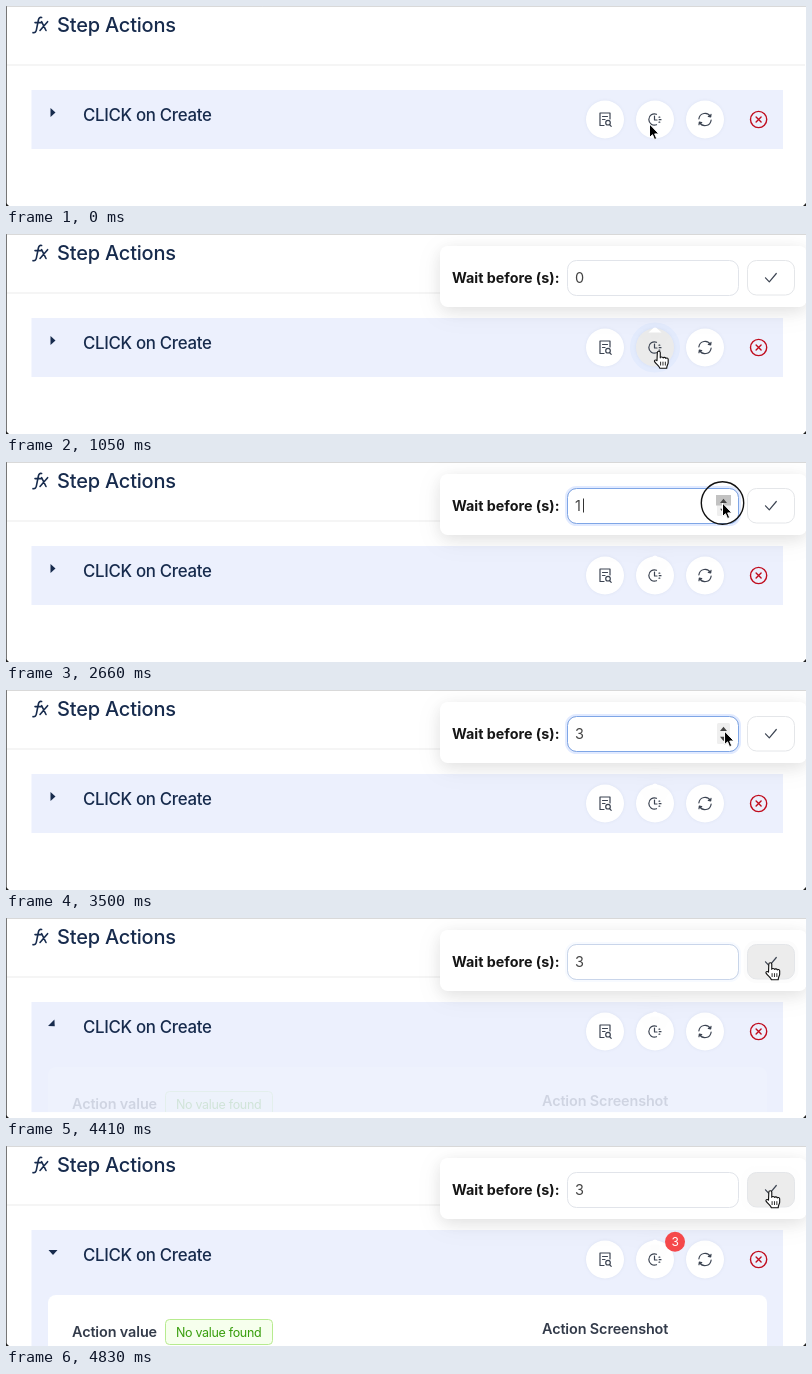
Write an HTML page that moves like this. It is 800x200 px and loops after 5320 ms.

```html
<!DOCTYPE html>
<html lang="en">
<head>
<meta charset="utf-8">
<title>Step Actions</title>
<style>
  html, body { margin: 0; width: 100%; height: 100%; overflow: hidden; background: #fff; }
  svg { display: block; width: 800px; height: 200px; font-family: Inter, "Liberation Sans", sans-serif; letter-spacing: -.02em; }
  .icon { fill: none; stroke: #3c4452; stroke-width: 1.2; stroke-linecap: round; stroke-linejoin: round; }
  .round { fill: #fff; filter: drop-shadow(0 0 1.5px rgba(40, 60, 120, .08)); }
  .bold { font-weight: 600; font-size: 14.4px; fill: #333b4a; letter-spacing: -.008em; }
  #popup { filter: drop-shadow(0 4px 8px rgba(0, 0, 0, .08)) drop-shadow(0 5px 12px rgba(0, 0, 0, .06)); }
</style>
</head>
<body>
<svg viewBox="0 0 800 200">
  <defs><clipPath id="clip"><rect id="clipBox" x="25.5" y="84" width="751.5" height="59"/></clipPath></defs>

  <path d="M27 26.6c2 .5 3-.9 3.4-2.8l2-9.8c.4-2 1.4-3 3.2-2.5M29 16.6h6M34 24.5l7.6-8.8M35.6 15.7l4.4 8.8" class="icon" style="stroke:#172b4d;stroke-width:1.6"/>
  <text x="51" y="26" font-size="20" font-weight="500" fill="#172b4d" letter-spacing="-.01em">Step Actions</text>
  <path d="M1 59h798" stroke="#ebebeb"/>

  <rect id="panel" x="25.5" y="84" width="751.5" height="59" fill="#ecf0fd"/>
  <g clip-path="url(#clip)">
    <g id="details" opacity="0">
      <rect x="42" y="149" width="719" height="100" rx="8" fill="#fff"/>
      <text class="bold" x="66" y="191">Action value</text>
      <rect x="159.5" y="173.5" width="107" height="25" rx="4" fill="#f6ffed" stroke="#b7eb8f"/>
      <text x="170" y="190.5" font-size="12.5" fill="#389e0d">No value found</text>
      <text class="bold" x="536" y="188">Action Screenshot</text>
    </g>
  </g>
  <path id="toggle" d="M44.5 102l5 4.5-5 4.5z" fill="#172b4d"/>
  <text x="77" y="114.5" font-size="16.85" font-weight="500" fill="#172b4d">CLICK on Create</text>

  <circle id="wave" cx="649" cy="113.5" fill="none" stroke="#1677ff"/>
  <circle class="round" cx="599" cy="113.5" r="19"/>
  <circle class="round" cx="649" cy="113.5" r="19" id="clock"/>
  <circle class="round" cx="699" cy="113.5" r="19"/>
  <g class="icon">
    <path d="M598 119.5h-4v-12.5h10v6M596.5 110.5h5M596.5 113.5h2.5M603.6 118.6l1.6 1.7"/>
    <circle cx="602" cy="116.7" r="2.3"/>
    <path d="M650.5 108.3a5.6 5.6 0 1 0 0 10.4M648.5 110v4h2.5M653 111.2h.8M653.2 113.7h1.8M653 116.2h.8"/>
    <path d="M692.9 112.8a6.2 6.2 0 0 1 11.6-2.2M705.1 114.2a6.2 6.2 0 0 1-11.6 2.2M705 108.3l-.3 2.5-2.4-.4M693 118.7l.3-2.5 2.4.4"/>
    <path d="M750.1 111l5 5M755.1 111l-5 5M744.5 113.5a8.1 8.1 0 1 0 16.2 0a8.1 8.1 0 1 0-16.2 0" style="stroke:#c00d1e;stroke-width:1.4"/>
  </g>

  <path d="M.5 200V0" stroke="#777"/>
  <path d="M0 .25h800" stroke="#999" stroke-width=".5"/>
  <path d="M0 197v3h3zM800 197v3h-3z" fill="#222"/>

  <g id="popup" opacity="0">
    <rect x="434" y="12" width="367" height="61" rx="8" fill="#fff"/>
    <path d="M642.5 98.5l5-4.5q1.5-1.2 3 0l5 4.5z" fill="#fff"/>
    <text x="446" y="48.5" font-size="14.3" font-weight="700" fill="#161616" letter-spacing="0">Wait before (s):</text>
    <rect id="glow" x="560.5" y="25.5" width="173" height="37" rx="10" fill="none" stroke="#2f6bff" stroke-opacity=".14" stroke-width="3"/>
    <rect x="561.5" y="26.5" width="171" height="35" rx="9" fill="#fff" stroke="#e1e4ea"/>
    <rect id="border" x="561.5" y="26.5" width="171" height="35" rx="9" fill="none" stroke="#7fa6e6"/>
    <text id="value" x="569" y="48.5" font-size="14.5" fill="#444">0</text>
    <path id="caret" d="M577.5 36.5v14" stroke="#333"/>
    <g id="spinner">
      <rect x="711" y="33" width="13" height="21" rx="1.5" fill="#efefef"/>
      <rect id="pressed" x="710" y="33" width="15" height="10.5" fill="#c2c2c2"/>
      <path d="M714 41l3.5-4.3 3.5 4.3zM714 46.8l3.5 4.3 3.5-4.3z" fill="#444"/>
    </g>
    <rect id="checkWave" fill="none" stroke="#d9d9d9"/>
    <rect id="check" x="741.5" y="26.5" width="47" height="34.5" rx="9" stroke="#e4e6e9"/>
    <path class="icon" d="M759.5 43.8l3.8 4 7-8.3"/>
  </g>

  <g id="badge">
    <circle r="10" fill="#f5484b"/>
    <text y="4.4" font-size="12" fill="#fff" text-anchor="middle">3</text>
  </g>

  <circle id="ring" r="21.2" fill="none" stroke="#111" stroke-width="1.4"/>
  <g id="cursor">
    <path id="arrow" d="M0 0V13.5l3-2.8 2 4.8 2.2-.9-2-4.7h4.2z" fill="#000" stroke="#fff"/>
    <path id="beam" d="M-3-6.5q3 0 3 2V4.5q0 2-3 2M3-6.5q-3 0-3 2M0 4.5q0 2 3 2" fill="none" stroke="#111" stroke-width="1.3"/>
    <g id="hand" transform="translate(-.2 -.2) scale(1.13 1.06)" stroke="#111" stroke-linejoin="round">
      <path d="M-1.3 1.2a1.3 1.3 0 0 1 2.6 0V6.2c0-1.2 2.4-1.2 2.5.2c.2-1 2.3-.9 2.4.4c.3-.8 2.1-.6 2.1.8V10.5c0 2-1.3 2.6-1.3 5.5H1c-.5-2.2-3-3.6-4.6-6c-.9-1.5.8-2.5 2-1.2z" fill="#fff"/>
      <path d="M1.6 9.8v3.6M3.7 9.8v3.6M5.8 9.8v3.6" stroke-width=".8"/>
    </g>
  </g>
</svg>
<script>
const LOOP = 5320, STEP = 70;
const el = Object.fromEntries([...document.querySelectorAll('[id]')].map(e => [e.id, e]));
const set = (name, attrs) => { for (const k in attrs) el[name].setAttribute(k, attrs[k]); };
const show = (name, on) => set(name, { visibility: on ? 'visible' : 'hidden' });

const span = (t, from, to) => Math.min(1, Math.max(0, (t - from) / (to - from)));
const smooth = p => p * p * (3 - 2 * p);
const cubic = p => p < .5 ? 4 * p ** 3 : 1 - 4 * (1 - p) ** 3;
const circOut = p => Math.sqrt(1 - (1 - p) ** 2);
const backOut = p => 1 + 2.7 * (p - 1) ** 3 + 1.7 * (p - 1) ** 2;
const between = (t, from, to) => t >= from && t < to;

// Pointer moves: start, end, destination
const moves = [
  [0, 210, 651, 118], [350, 420, 653, 117.5], [1190, 1750, 730.5, 35],
  [1750, 2030, 716.5, 41], [3430, 3990, 764, 44], [3990, 4060, 764.5, 45]
];
// Mouse button held down
const clicks = [[560, 700], [2170, 2380], [2590, 2730], [3010, 3220], [4200, 4340]];

function pointer(t) {
  let x = 643.5, y = 118;
  for (const [from, to, nx, ny] of moves) {
    const p = smooth(span(t, from, to));
    x += (nx - x) * p;
    y += (ny - y) * p;
  }
  return [x, y];
}

function wave(t, start) {
  return { spread: 6 * circOut(span(t, start, start + 400)), alpha: t < start ? 0 : .1 * (1 - circOut(span(t, start, start + 2000))) };
}

function draw(t) {
  const [x, y] = pointer(t);
  const inInput = x > 561 && x < 733 && y > 26 && y < 62;
  const inSpinner = inInput && x > 710 && x < 725 && y > 33 && y < 55;
  const inCheck = x > 741 && y < 61;
  const inClock = t >= 140 && Math.hypot(x - 649, y - 113.5) < 19;
  const kind = inCheck || inClock ? 'hand' : inInput && !inSpinner ? 'beam' : 'arrow';
  for (const name of ['hand', 'beam', 'arrow']) show(name, name === kind);
  set('cursor', { transform: `translate(${x} ${y})` });

  const down = clicks.some(([from, to]) => between(t, from, to));
  show('ring', down);
  set('ring', { cx: x, cy: y });

  // Clock button and its popup
  const grey = span(t, 0, 210) - span(t, 2100, 2310);
  const shade = 255 - 20 * grey;
  set('clock', { style: `fill:rgb(${shade},${shade},${shade})` });
  const w = wave(t, 700);
  set('wave', { r: 19 + w.spread / 2, 'stroke-width': w.spread, opacity: w.alpha });
  const open = circOut(span(t, 700, 910)), zoom = .8 + .2 * open;
  set('popup', { opacity: open, transform: `translate(649 93) scale(${zoom}) translate(-649 -93)` });

  // Number input
  const focus = span(t, 2100, 2310) - span(t, 4200, 4480);
  set('glow', { opacity: focus });
  set('border', { opacity: Math.max(focus, inInput ? 1 : 0) });
  show('spinner', inInput || between(t, 2170, 4200));
  show('pressed', down && inSpinner);
  show('caret', between(t, 2240, 3500));
  el.value.textContent = [2240, 2730, 3080].filter(s => t >= s).length;

  // Confirm button
  set('check', { fill: inCheck ? '#ececec' : '#fff' });
  const c = wave(t, 4340), s = c.spread / 2;
  set('checkWave', {
    x: 741 - s, y: 26 - s, width: 48 + 2 * s, height: 35.5 + 2 * s,
    rx: 9 + s, 'stroke-width': c.spread, opacity: c.alpha
  });

  // Expanding step
  const grow = cubic(span(t, 4340, 4550)), height = 59 + 345 * grow;
  set('panel', { height });
  set('clipBox', { height });
  set('details', { opacity: grow });
  set('toggle', { transform: `rotate(${90 * smooth(span(t, 4290, 4530))} 47 106.5)` });
  const pop = span(t, 4550, 4830);
  show('badge', pop > 0);
  set('badge', { opacity: Math.min(1, pop * 2), transform: `translate(669 95.7) scale(${backOut(pop)})` });
}

function tick() {
  draw(Math.floor(performance.now() % LOOP / STEP) * STEP);
  requestAnimationFrame(tick);
}
tick();
</script>
</body>
</html>
```
